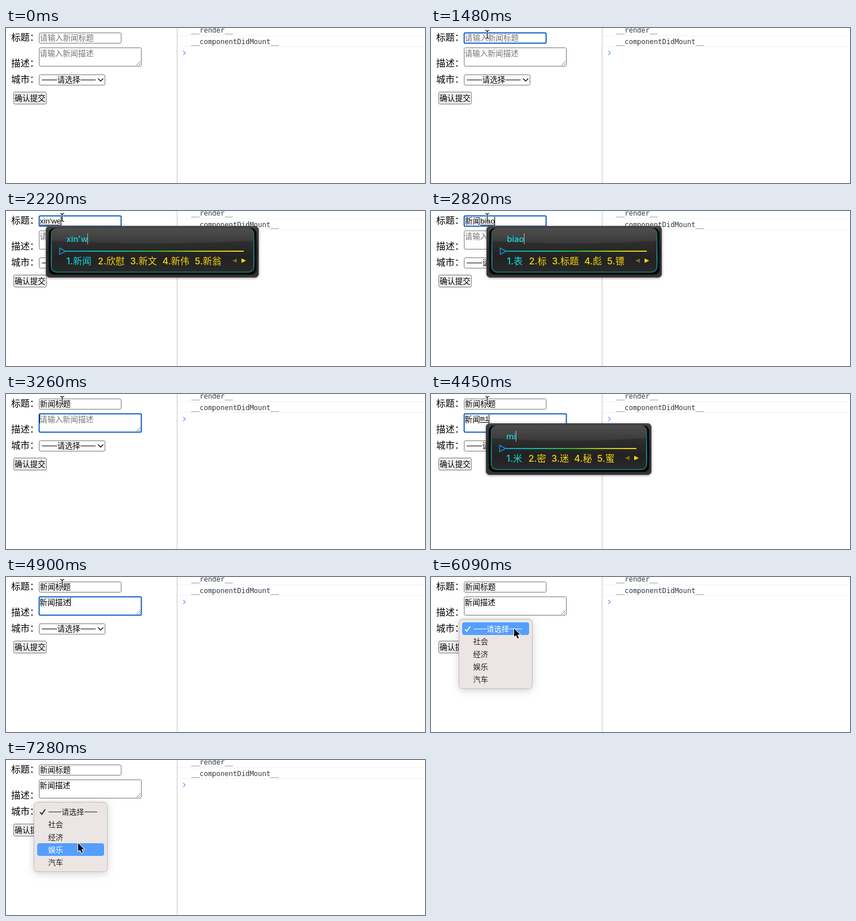
Recreate the animation shown at these times as an HTML page with a canvas. Size 726 by 270 pixels, loop 8 s.

```html
<!DOCTYPE html>
<html lang="zh-CN">
<head>
<meta charset="utf-8">
<title>表单输入</title>
<style>
html, body { margin: 0; width: 726px; height: 270px; overflow: hidden; background: #fff; }
canvas { display: block; width: 726px; height: 270px; }
</style>
</head>
<body>
<canvas id="stage"></canvas>
<script>
const W = 726, H = 270, LOOP = 8000;
const canvas = document.getElementById('stage');
const ctx = canvas.getContext('2d');
const ratio = window.devicePixelRatio || 1;
canvas.width = W * ratio;
canvas.height = H * ratio;

const CJK = '"Noto Sans CJK SC", "Noto Sans CJK", sans-serif';
const FIELD = '13.333px "Liberation Sans", ' + CJK;
const AREA = '13.333px "Liberation Mono", "Noto Sans CJK SC", monospace';
const UI = '13px ' + CJK;
const BLUE = '#0f5fc8', GREY = '#767676', CYAN = '#12d8da', YELLOW = '#f5d50f';

// time, committed text, composing text, input-method text, candidates
const TITLE = [
  [0, '', '', '', ''],
  [1780, '', 'x', 'x', '想 下 小 系 行'],
  [1920, '', 'xi', 'xi', '系 西 洗 吸 喜'],
  [2220, '', "xin'we", "xin'w", '新闻 欣慰 新文 新伟 新翁'],
  [2370, '', "xin'wen", "xin'wen", '新闻 欣慰 新文 新伟 新翁'],
  [2520, '新闻', '', '', ''],
  [2670, '新闻', 'bi', 'bi', '比 笔 必 币 毕'],
  [2820, '新闻', 'biao', 'biao', '表 标 标题 彪 镖'],
  [2970, '新闻', "biao't", "biao't", '标题 表态 表头 标贴 标图'],
  [3120, '新闻', "biao'ti", "biao'ti", '标题 表体 标体 表题 标提'],
  [3260, '新闻标题', '', '', '']
];
const DETAIL = [
  [0, '', '', '', ''],
  [3560, '', 'x', 'x', '想 下 小 系 行'],
  [3710, '', 'xin', 'xin', '新 心 信 辛 欣'],
  [3860, '', "xin'w", "xin'w", '新闻 新物 新屋 信物 新网'],
  [4010, '', "xin'wen", "xin'we", '新闻 欣慰 新文 新伟 新翁'],
  [4160, '新闻', '', '', ''],
  [4310, '新闻', 'mi', 'mi', '米 密 迷 秘 蜜'],
  [4460, '新闻', 'miao', 'miao', '秒 喵 描 妙 苗'],
  [4600, '新闻', "miao's", "miao's", '描述 秒杀 喵声 妙手 描绘'],
  [4750, '新闻', "miao'shu", "miao'shu", '描述 妙术 秒数 苗树 妙书'],
  [4900, '新闻描述', '', '', '']
];
// time, x, y, shape
const POINTER = [
  [290, 224, 218, 'arrow'], [440, 192, 166, 'arrow'], [590, 150, 103, 'arrow'],
  [740, 118, 46, 'beam'], [890, 97, 11, 'beam'],
  [5050, 104, 20, 'beam'], [5200, 125, 55, 'beam'], [5350, 147, 116, 'arrow'],
  [5490, 151, 134, 'arrow'], [5640, 147, 104, 'arrow'], [5790, 144, 90, 'arrow'],
  [6690, 143, 104, 'arrow'], [6840, 138, 119, 'arrow'], [6990, 131, 133, 'arrow'],
  [7140, 127, 141, 'arrow'], [7280, 125, 145, 'arrow']
];
const OPTIONS = ['请选择', '社会', '经济', '娱乐', '汽车'];

const at = (list, t) => list.filter(row => row[0] <= t).pop();

function text(str, x, y, font, color) {
  ctx.font = font;
  ctx.fillStyle = color;
  ctx.fillText(str, x, y);
}

function box(x, y, w, h, r, fill, stroke, width = 1) {
  ctx.beginPath();
  ctx.roundRect(x, y, w, h, r);
  if (fill) { ctx.fillStyle = fill; ctx.fill(); }
  if (stroke) { ctx.strokeStyle = stroke; ctx.lineWidth = width; ctx.stroke(); }
}

function path(points, color, width, closed) {
  ctx.beginPath();
  points.forEach(p => ctx.lineTo(p[0], p[1]));
  if (closed) ctx.closePath();
  ctx.strokeStyle = color;
  ctx.lineWidth = width;
  ctx.stroke();
}

function shape(points, color) {
  ctx.beginPath();
  points.forEach(p => ctx.lineTo(p[0], p[1]));
  ctx.fillStyle = color;
  ctx.fill();
}

function fade(x0, y0, x1, y1, colors) {
  const g = ctx.createLinearGradient(x0, y0, x1, y1);
  colors.forEach((c, i) => g.addColorStop(i / (colors.length - 1), c));
  return g;
}

// The prompt option: a word between two long dashes.
function dashed(word, x, y, size, dash, color) {
  const font = size + 'px ' + CJK;
  const end = x + dash + 3 * size;
  text(word, x + dash, y, font, color);
  ctx.fillRect(x, y - 5, dash - .5, 1);
  ctx.fillRect(end + .5, y - 5, dash - .5, 1);
}

function drawConsole() {
  const mono = '12px "DejaVu Sans Mono", monospace';
  ctx.fillStyle = '#c4c4c4';
  ctx.fillRect(296, 0, 1, H);
  ctx.fillStyle = '#f0f0f0';
  ctx.fillRect(297, 13, W, 1);
  ctx.fillRect(297, 32, W, 1);
  text('__render__', 321, 8, mono, '#303942');
  text('__componentDidMount__', 321, 28, mono, '#303942');
  path([[307, 40], [310.7, 43.5], [307, 47]], '#72a4ef', 1.4);
}

// Draws a text control and returns where its composition starts.
function drawField(f, state, focused, caret) {
  const [, done, typing] = state;
  box(f.x + .5, f.y + .5, f.w - 1, f.h - 1, 2, '#fff', focused ? BLUE : GREY, focused ? 2 : 1);
  if (f.grip) {
    path([[226, 65], [233, 58]], '#777', 1);
    path([[230, 65], [233, 62]], '#777', 1);
  }
  if (!done && !typing) text(f.hint, f.tx, f.base, f.font, '#757575');
  text(done, f.tx, f.base, f.font, '#000');
  const start = f.tx + ctx.measureText(done).width;
  text(typing, start, f.base - f.lift, f.font, '#000');
  const end = start + ctx.measureText(typing).width;
  ctx.fillStyle = '#000';
  if (typing) ctx.fillRect(start, f.line, end - start, 1);
  if (focused && caret) ctx.fillRect(Math.floor(end), f.top, 1, 15);
  return start;
}

const titleField = { x: 57, y: 8, w: 143, h: 19, tx: 58.8, base: 22, lift: 0, line: 24, top: 10,
  font: FIELD, hint: '请输入新闻标题' };
const detailField = { x: 57, y: 34, w: 178, h: 33, tx: 58.3, base: 48.5, lift: 2, line: 49, top: 36,
  font: AREA, hint: '请输入新闻描述', grip: true };

function drawForm() {
  ['标题：', '描述：', '城市：'].forEach((s, i) =>
    text(s, 9, [22, 66.5, 95][i], '16px ' + CJK, '#000'));
  box(57.5, 81.5, 114, 18, 2, '#fff', GREY);
  dashed('请选择', 62, 95, 13.333, 26.7, '#000');
  path([[159.5, 88], [164, 92.5], [168.5, 88]], '#111', 1.5);
  box(13.5, 111.5, 56.5, 21, 2, '#efefef', GREY);
  text('确认提交', 15, 127, '13.333px ' + CJK, '#000');
}

function drawInputMethod(x, y, typed, list) {
  const words = list.split(' ');
  const xs = [x + 35.5];
  words.forEach((w, i) => xs.push(xs[i] + 23.4 + 16.3 * w.length - (i ? 0 : 1.5)));
  const right = Math.round(xs[words.length] + 54.9);
  const w = right - x;

  ctx.save();
  ctx.shadowColor = 'rgba(0,0,0,.4)';
  ctx.shadowBlur = 4 * ratio;
  ctx.shadowOffsetY = ratio;
  box(x, y, w, 90, 7, '#2c2c2c');
  ctx.restore();
  box(x + .5, y + .5, w - 1, 89, 7, fade(0, y, 0, y + 90, ['#444', '#2a2a2a', '#333']), '#4c4c4c');
  box(x + 5, y + 4, w - 9, 81, 9, '#080808');
  const pw = w - 17;
  box(x + 9, y + 4, pw, 77, 9, fade(0, y + 4, 0, y + 81, ['#434343', '#2d2d2d', '#222', '#292929']));

  ctx.save();
  ctx.beginPath();
  ctx.roundRect(x + 9, y + 4, pw, 77, 9);
  ctx.clip();
  ctx.beginPath();
  ctx.moveTo(x, y);
  ctx.lineTo(right, y);
  ctx.lineTo(right, y + 25);
  ctx.quadraticCurveTo(x + w / 2, y + 36, x, y + 25);
  ctx.fillStyle = 'rgba(255,255,255,.06)';
  ctx.fill();
  ctx.restore();
  box(x + 9.5, y + 4.5, pw - 1, 76, 9, null,
    fade(0, y + 4, 0, y + 81, ['rgba(20,150,155,0)', '#128a90', '#18b2b8', '#128085']), 1.4);

  text(typed, x + 35.5, y + 27.5, '500 14.7px Inter, sans-serif', CYAN);
  const caret = x + 35.5 + ctx.measureText(typed).width;
  ctx.fillStyle = '#b5b5b5';
  ctx.fillRect(Math.floor(caret), y + 13, 1, 19);

  ctx.fillStyle = fade(x + 34, 0, right - 26, 0, ['#0b9fc4', '#13b9a0', '#2fb52c', '#b8c81c', '#f3d21a']);
  ctx.fillRect(x + 34, y + 43, right - 26 - x - 34, 2);
  path([[x + 24, y + 38.5], [x + 34, y + 44], [x + 24, y + 49.5]], '#1692d2', 1.5, true);

  words.forEach((word, i) => text(i + 1 + '.' + word, xs[i], y + 67,
    '500 16px Inter, ' + CJK, i ? YELLOW : CYAN));
  const ay = y + 60.5;
  shape([[right - 46, ay], [right - 38, ay - 4], [right - 38, ay + 4]], '#75691d');
  shape([[right - 22, ay], [right - 30, ay - 4], [right - 30, ay + 4]], YELLOW);
}

function drawMenu(active) {
  ctx.save();
  ctx.shadowColor = 'rgba(0,0,0,.2)';
  ctx.shadowBlur = 14 * ratio;
  ctx.shadowOffsetY = 3 * ratio;
  box(49, 73, 126, 121, 6, '#ebe6e3');
  ctx.restore();
  box(48.5, 73.5, 127, 121, 6, '#ebe6e3', '#c2bfbd');
  box(54, 79 + active * 22, 116, 22, 4, '#559eff');
  OPTIONS.forEach((name, i) => {
    const color = i === active ? '#fff' : '#222';
    const y = 95 + i * 22;
    if (i) {
      text(name, 73, y - .5, UI, color);
    } else {
      dashed(name, 73.5, y, 13, 22.8, color);
      path([[59, 91], [62, 94.5], [68, 86]], color, 1.8);
    }
  });
}

function drawPointer(x, y, kind) {
  ctx.save();
  ctx.translate(x, y);
  ctx.lineJoin = 'round';
  if (kind === 'beam') {
    [['rgba(255,255,255,.85)', 3], ['#111', 1.2]].forEach(([color, width]) => {
      path([[-3, -7], [-1, -6.5], [.5, -5], [.5, 5.5], [-1, 7], [-3, 7.5]], color, width);
      path([[4, -7], [2, -6.5], [.5, -5], [.5, 5.5], [2, 7], [4, 7.5]], color, width);
    });
  } else {
    const tip = [[0, 0], [0, 14.3], [3.2, 11.3], [5.7, 17], [8.2, 16], [5.8, 10.4], [10.3, 10.2]];
    path(tip, '#fff', 2, true);
    shape(tip, '#000');
  }
  ctx.restore();
}

function draw(t) {
  ctx.setTransform(ratio, 0, 0, ratio, 0, 0);
  ctx.fillStyle = '#fff';
  ctx.fillRect(0, 0, W, H);
  const title = at(TITLE, t), detail = at(DETAIL, t);
  const caret = t < 1480 || t >= 1780;

  drawConsole();
  drawForm();
  const a = drawField(titleField, title, t >= 1030 && t < 3260, caret);
  const b = drawField(detailField, detail, t >= 3260 && t < 5940, caret);
  if (title[3]) drawInputMethod(Math.floor(a + 10.8), 26, title[3], title[4]);
  if (detail[3]) drawInputMethod(Math.floor(b + 10.8), 51, detail[3], detail[4]);

  const p = at(POINTER, t);
  if (t >= 6090) drawMenu(Math.floor((p[2] - 79) / 22));
  if (p) drawPointer(p[1], p[2], p[3]);
}

function tick() {
  draw(performance.now() % LOOP);
  requestAnimationFrame(tick);
}
tick();
</script>
</body>
</html>
```
